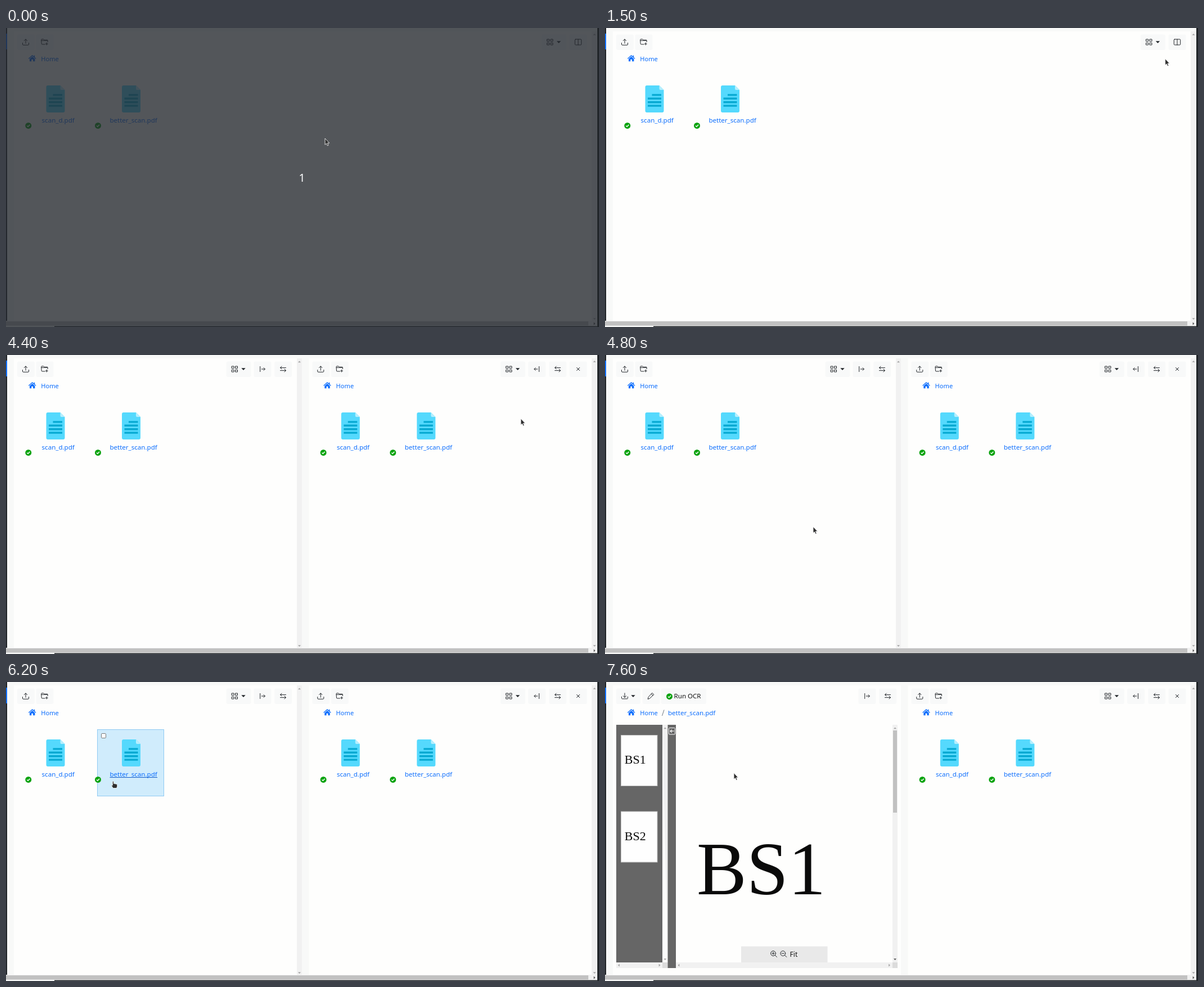
These frames come from a looping animation (1054 by 531 pixels, 8 s). An HTML page:

```html
<!DOCTYPE html>
<html lang="en">
<head>
<meta charset="utf-8">
<title>File manager</title>
<style>
html, body { margin: 0; width: 100%; height: 100%; overflow: hidden; background: #fefefe; }
svg { display: block; }
text { font-family: "Noto Sans", "Open Sans", sans-serif; font-size: 11.55px; fill: #111; }
.link { fill: #0d6efd; }
.home { font-size: 11.1px; }
.serif { font-family: "Liberation Serif", serif; font-size: 22px; fill: #0a0a0a; }
.line { fill: none; stroke: #212529; stroke-width: 1; stroke-linecap: round; stroke-linejoin: round; }
.btn { fill: #f8f9f9; }
.track { fill: #f1f1f1; }
.thumb { fill: #c1c1c1; }
.corner { fill: #dcdcdc; }
.arrow { fill: #a3a3a3; }
.dark { fill: #505050; }
.side { fill: #666; }
.hidden { display: none; }
</style>
</head>
<body>
<svg width="1054" height="531" viewBox="0 0 1054 531">
  <defs>
    <g id="upload" class="line"><path d="M-5.5 1.5V4a1.3 1.3 0 0 0 1.3 1.3H4.2A1.3 1.3 0 0 0 5.5 4V1.5M0 2.3V-5M-2.7-2.4 0-5.1 2.7-2.4"/></g>
    <g id="download" class="line"><path d="M-5.5 1.2V3.6a1.3 1.3 0 0 0 1.3 1.3H4.2a1.3 1.3 0 0 0 1.3-1.3V1.2M0-5.2V2.3M-2.6-.3 0 2.4 2.6-.3"/></g>
    <g id="folder" class="line"><path d="M.6 4.5H-4.3a1 1 0 0 1-1-1L-5.7-2.6V-3.6a1 1 0 0 1 1-1H-2L-.5-3.2H4.7a1 1 0 0 1 1 1.1L5.5.2M-5.6-2.2H5M3.8 1.7V5.7M1.8 3.7H5.8"/></g>
    <g id="grid" class="line"><path d="M-5-5h3.6v3.6H-5zM1.4-5H5v3.6H1.4zM-5 1.4h3.6V5H-5zM1.4 1.4H5V5H1.4z"/></g>
    <path id="caret" d="M-3.7-1.8H3.7L0 2z" fill="#212529"/>
    <g id="split" class="line"><rect x="-5.7" y="-5" width="11.4" height="10" rx="1.2"/><path d="M0-5V5"/></g>
    <g id="toRight" class="line"><path d="M-4-4.6V4.6M-1.4 0H4.6M2.3-2.4 4.7 0 2.3 2.4"/></g>
    <g id="swap" class="line"><path d="M5-2.4H-5M-2.5-4.9-5-2.4-2.5 0M-5 2.6H5M2.5 0 5 2.6 2.5 5"/></g>
    <path id="cross" class="line" d="M-2.6-2.6 2.6 2.6M2.6-2.6-2.6 2.6"/>
    <path id="pencil" class="line" d="M2.6-5.4 5.3-2.7-2.3 4.4-5.4 5.4-4.4 2zM1-3.8 3.7-1.1"/>
    <g id="check"><circle r="5.5" fill="#0ba30f"/><path d="M-2.5.1-.7 1.9 2.6-1.7" fill="none" stroke="#fff" stroke-width="1.4"/></g>
    <path id="house" fill="#0d6efd" d="M0-6 2.8-3.5V-5.2H4.4V-2.1L6.8 0 6 .9 0-4.3-6 .9-6.8 0ZM0-3.2 4.7.9V5.3H1.4V1.8H-1.4V5.3H-4.7V.9Z"/>
    <g id="file">
      <path d="M3 0H25L33 8V45a3 3 0 0 1-3 3H3a3 3 0 0 1-3-3V3a3 3 0 0 1 3-3z" fill="#55d9fd"/>
      <path d="M25 0 33 8H27a2 2 0 0 1-2-2z" fill="#b5effe"/>
      <path d="M12 15.2H28.5v3.4H12zM4.5 21.5h24v3.4h-24zM4.5 28h24v3.4h-24zM4.5 34.4h24v3.4h-24z" fill="#06a9d2"/>
    </g>
    <path id="up" d="M-2.5 1.3H2.5L0-1.4z"/>
    <g id="tile">
      <rect x="162.5" y="84.5" width="118" height="118" fill="#d0ecfc" stroke="#8fcaf3"/>
      <rect x="169.5" y="91.5" width="8" height="8" rx="1.3" fill="#fff" stroke="#767676"/>
    </g>
    <g id="leftTools">
      <rect class="btn" x="20" y="11.5" width="31" height="27.5" rx="3"/>
      <rect class="btn" x="53.5" y="11.5" width="31" height="27.5" rx="3"/>
      <use href="#upload" x="35" y="25"/>
      <use href="#folder" x="68.5" y="24.5"/>
    </g>
    <g id="crumb">
      <use href="#house" x="46.7" y="54"/>
      <text class="link home" x="62.3" y="58.5">Home</text>
    </g>
    <g id="files">
      <use href="#file" x="71.5" y="102"/>
      <use href="#file" x="206" y="102"/>
      <text class="link" x="63.6" y="168">scan_d.pdf</text>
      <text class="link" x="184.4" y="168">better_scan.pdf</text>
      <use href="#check" x="39.8" y="173.4"/>
      <use href="#check" x="163.5" y="173.4"/>
    </g>
    <g id="view">
      <rect class="btn" x="-22" y="-13.5" width="44" height="27.5" rx="3"/>
      <use href="#grid" x="-7"/>
      <use href="#caret" x="8.5"/>
    </g>
    <rect id="box" class="btn" x="-15.3" y="-13.5" width="31" height="27.5" rx="3"/>
  </defs>

  <rect width="1054" height="531" fill="#f8f9f8"/>
  <rect x="14" y="6" width="1027" height="514" fill="#fefefd"/>

  <g id="single">
    <use href="#view" x="974" y="25"/>
    <use href="#box" x="1017" y="25"/>
    <use href="#split" x="1017" y="25"/>
  </g>

  <g id="double">
    <rect x="526" y="6" width="12.5" height="514" fill="#f8f9f8"/>
    <g transform="translate(524.3 0)"><use href="#leftTools"/><use href="#crumb"/><use href="#files"/></g>
    <use href="#view" x="901" y="25"/>
    <use href="#box" x="943.5" y="25"/>
    <use href="#toRight" transform="translate(943.5 25) scale(-1 1)"/>
    <use href="#box" x="980.5" y="25"/>
    <use href="#swap" x="980.5" y="25"/>
    <use href="#box" x="1017" y="25"/>
    <use href="#cross" x="1017" y="25"/>
    <g id="listTools">
      <rect class="track" x="517" y="6" width="9" height="514"/>
      <g class="arrow"><use href="#up" x="521.5" y="12"/><use href="#up" transform="translate(521.5 516.5) scale(1 -1)"/></g>
      <use href="#view" x="413.5" y="25"/>
      <use href="#box" x="455.7" y="25"/>
      <use href="#toRight" x="455.7" y="25"/>
      <use href="#box" x="492.5" y="25"/>
      <use href="#swap" x="492.5" y="25"/>
    </g>
  </g>

  <use href="#crumb"/>
  <g id="list">
    <use href="#leftTools"/>
    <use id="tileA" href="#tile" x="-134"/>
    <use id="tileB" href="#tile"/>
    <rect id="focus" x="173.5" y="149.5" width="106.5" height="47.5" fill="none" stroke="#9fcaf6"/>
    <use href="#files"/>
    <path id="underline" d="M184.5 169.5H269" stroke="#0a58ca"/>
  </g>

  <g id="viewer">
    <rect class="btn" x="20" y="11.5" width="43" height="27.5" rx="3"/>
    <use href="#download" x="35" y="25"/>
    <use href="#caret" x="50" y="25"/>
    <use href="#box" x="82" y="25"/>
    <use href="#pencil" x="81.5" y="25"/>
    <rect class="btn" x="99.5" y="11.5" width="80.5" height="27.5" rx="3"/>
    <use href="#check" x="114.5" y="25.7"/>
    <text x="122.6" y="29.3">Run OCR</text>
    <use href="#box" x="465.7" y="25"/>
    <use href="#toRight" x="465.7" y="25"/>
    <use href="#box" x="502.5" y="25"/>
    <use href="#swap" x="502.5" y="25"/>
    <path d="M101.5 60 105 49.5" stroke="#6c757d"/>
    <text class="link" x="112" y="58.5">better_scan.pdf</text>
    <g id="shell">
      <rect class="side" x="20" y="76" width="82" height="422"/>
      <path class="track" d="M102 76h9.5v422H20v10h82v-10h9.5zM511 76h9v422h-9zM126 498h385v10H126z"/>
      <path class="corner" d="M102 498h9.5v10H102zM511 498h9v10h-9z"/>
      <rect class="side" x="111.5" y="76" width="14.5" height="432"/>
      <rect x="113.5" y="81.5" width="11" height="11.5" rx="1" fill="none" stroke="#fff"/>
      <path d="M122.5 87.2H116M118.6 84.6 116 87.2 118.6 89.8" fill="none" stroke="#fff" stroke-width="1.2"/>
      <g class="arrow">
        <use href="#up" x="106.8" y="82"/>
        <use href="#up" transform="translate(106.8 492.5) scale(1 -1)"/>
        <use href="#up" transform="translate(24.5 503) rotate(-90)"/>
        <use href="#up" transform="translate(97 503) rotate(90)"/>
        <use href="#up" transform="translate(131 503) rotate(-90)"/>
        <use href="#up" transform="translate(505.5 503) rotate(90)"/>
        <use href="#up" x="515.5" y="82"/>
      </g>
      <use class="dark" href="#up" transform="translate(515.5 492.5) scale(1 -1)"/>
    </g>
    <g id="pages">
      <rect class="thumb" x="512" y="86" width="7" height="146"/>
      <rect x="28.5" y="94.5" width="64.5" height="90" fill="#fefefe" stroke="#bbb"/>
      <rect x="28.5" y="230" width="64.5" height="90" fill="#fefefe" stroke="#bbb"/>
      <text class="serif" x="34.8" y="144.5">BS1</text>
      <text class="serif" x="34.8" y="280.5">BS2</text>
      <text class="serif" x="163" y="377" style="font-size:133px">BS1</text>
      <rect x="242" y="469.5" width="153.5" height="28.5" fill="#e9e9e9"/>
      <g class="line">
        <circle cx="299" cy="482" r="4.4"/><path d="M302.3 485.3 305.5 488.5M296.8 482H301.2M299 479.8V484.2"/>
        <circle cx="316.3" cy="482" r="4.4"/><path d="M319.6 485.3 322.8 488.5M314.1 482H318.5"/>
      </g>
      <text x="328.6" y="487.8" style="font-size:12px">Fit</text>
    </g>
  </g>

  <rect class="track" x="1041" y="6" width="10" height="514"/>
  <g class="arrow"><use href="#up" x="1046" y="11.5"/><use href="#up" transform="translate(1046 516.5) scale(1 -1)"/></g>
  <rect class="track" y="520" width="1051" height="9.5"/>
  <rect class="thumb" y="521" width="1035" height="7.5"/>
  <use class="dark" href="#up" transform="translate(1046 525) rotate(90)"/>
  <path d="M0 0H2V520H0zM1051 0h3V531h-3zM86 529.5h968V531H86z" fill="#212529"/>
  <rect y="10" width="2" height="28" fill="#0d6efd"/>

  <g id="tip">
    <path d="M1012 44.5 1016.7 39.5 1021.4 44.5z" fill="#191919"/>
    <rect x="986" y="44" width="61" height="21" rx="3.5" fill="#191919"/>
    <text x="991.8" y="58.2" style="font-size:10px;fill:#fff">Split panel</text>
  </g>

  <g id="count">
    <rect width="1051" height="531" fill="#262930" opacity=".79"/>
    <text x="526" y="272.5" text-anchor="middle" style="font-size:19.5px;fill:#fff">1</text>
  </g>

  <g id="cursor" fill="#2e2e2e" stroke="#fff" stroke-width=".8" stroke-linejoin="round">
    <path id="pointer" d="M0 0V11.3L2.5 9 4.3 13 6.2 12.1 4.4 8.3H7.8z"/>
    <path id="hand" d="M-1 .9Q0-.4 1.2.9V4.6Q2.4 3.9 3.2 4.9 4.4 4.3 5.2 5.3 6.6 4.9 7.4 6.2V9.6L6.2 12.5H0L-2.6 8.4Q-2.7 6.9-1 7.5z"/>
  </g>
</svg>
<script>
const LOOP = 8000, STEP = 100;
const $ = id => document.getElementById(id);
const show = (id, on) => $(id).classList.toggle("hidden", !on);

// time, x, y of the pointer tip
const path = [
  [200, 567, 196], [400, 592, 192], [600, 715, 160], [800, 860, 118], [1000, 948, 91], [1100, 968, 84],
  [1300, 981, 72], [1600, 1003, 46], [1800, 1012, 33], [2000, 1015, 26], [2200, 1018, 27],
  [2900, 1018, 27], [3100, 1019, 30], [4200, 1019, 30], [4300, 985, 54], [4400, 915, 113],
  [4600, 680, 235], [4800, 370, 305], [5000, 135, 268], [5100, 82, 247], [5300, 81, 235],
  [5500, 83, 220], [5700, 91, 200], [5800, 108, 192], [6000, 163, 192], [6300, 204, 168],
  [6400, 204, 168], [6700, 225, 164], [6900, 233, 162], [7000, 229, 161.5]
];

function pointAt(t) {
  const i = path.findIndex(p => p[0] > t);
  if (i === 0) return path[0].slice(1);
  if (i < 0) return path[path.length - 1].slice(1);
  const a = path[i - 1], b = path[i], k = (t - a[0]) / (b[0] - a[0]);
  return [a[1] + (b[1] - a[1]) * k, a[2] + (b[2] - a[2]) * k];
}

function tipAlpha(t) {
  if (t < 2500 || t >= 4000) return 0;
  return t < 3800 ? Math.min(1, (t - 2400) / 300) : (4000 - t) / 300;
}

function draw(time) {
  const t = Math.floor(time / STEP) * STEP;
  const [x, y] = pointAt(t);
  const overButton = t < 4300 && x > 1002 && y < 39;
  const overLink = t >= 6200 && t < 7400;

  show("count", t < 100);
  show("single", t < 3800);
  show("double", t >= 3800);
  show("list", t < 7400);
  show("listTools", t < 7400);
  show("viewer", t >= 7400);
  show("shell", t >= 7500);
  show("pages", t >= 7600);
  show("tileA", t >= 5800 && t < 6000);
  show("tileB", t >= 6000);
  show("underline", overLink);
  show("focus", t >= 7300);
  show("hand", overButton || overLink);
  show("pointer", !overButton && !overLink);
  $("tip").setAttribute("opacity", tipAlpha(t));
  $("cursor").setAttribute("transform", `translate(${x} ${y})`);
}

const start = performance.now();
function tick() {
  draw((performance.now() - start) % LOOP);
  requestAnimationFrame(tick);
}
tick();
</script>
</body>
</html>
```
